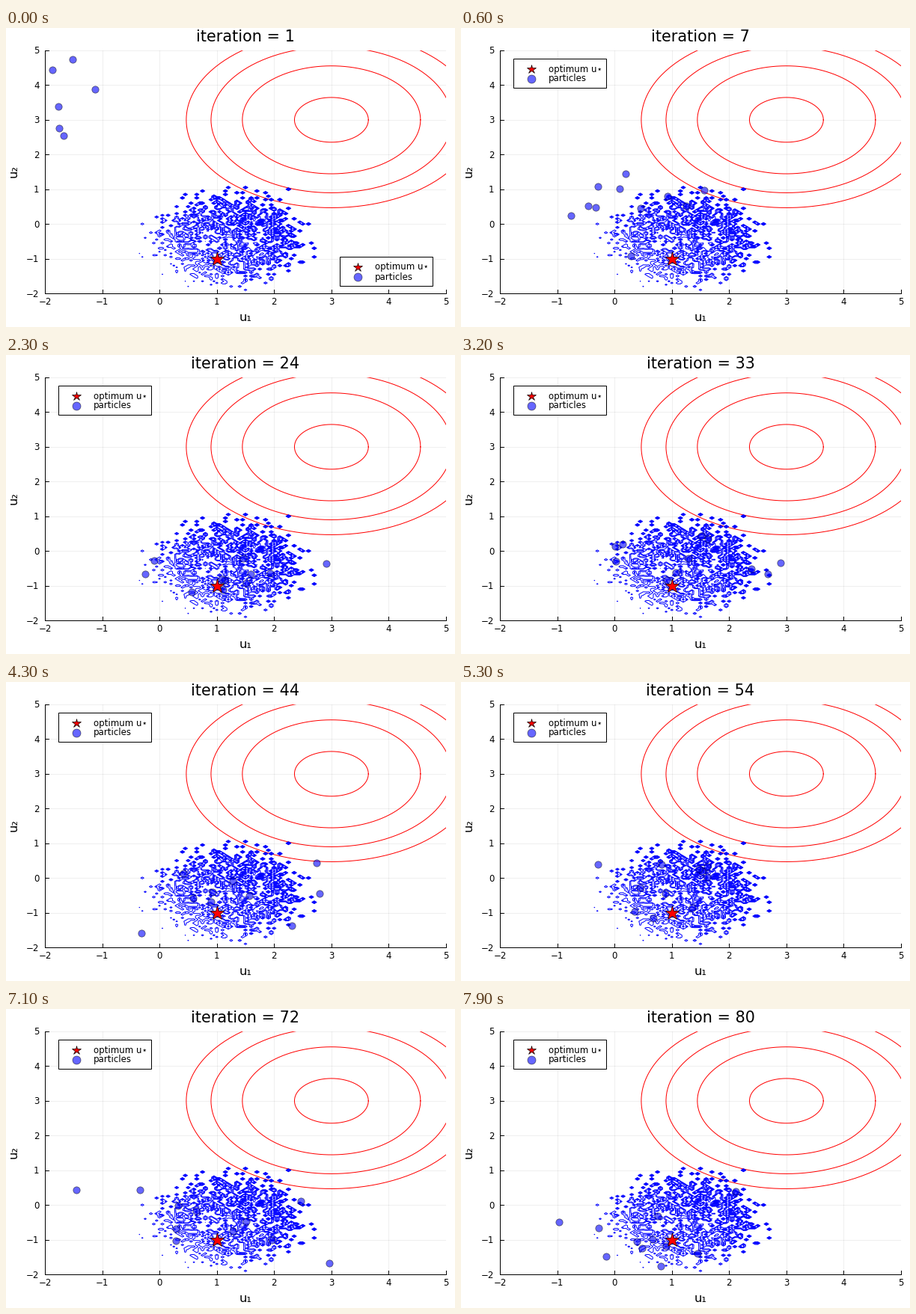
These frames come from a looping animation (600x400 px, 8000 ms). A matplotlib script:

```python
import numpy as np
import matplotlib.pyplot as plt
from matplotlib.animation import FuncAnimation
from matplotlib.patches import Rectangle

W, H, DPI = 600, 400, 100
FRAMES, INTERVAL = 80, 100
PX = 72 / DPI
L, R, T, B = 52, 588, 30, 355
LEGEND_MOVE = 5
FILL, EDGE = (0, 0, 1, 0.6), (0, 0, 0, 0.6)

plt.rcParams["font.family"] = "DejaVu Sans"
rng = np.random.default_rng(7)

fig = plt.figure(figsize=(W / DPI, H / DPI), dpi=DPI, facecolor="white")
ax = fig.add_axes([L / W, 1 - B / H, (R - L) / W, (B - T) / H])
ax.set(xlim=(-2, 5), ylim=(-2, 5))
ax.axis("off")
page = fig.add_axes([0, 0, 1, 1])
page.set(xlim=(0, W), ylim=(H, 0))
page.patch.set_visible(False)
page.axis("off")


def text(x, y, s, size, ha="center", **kw):
    kw.setdefault("va", "baseline")
    return page.text(x, y, s, fontsize=size * PX, ha=ha, **kw)


def stroke(x, y):
    page.plot(x, y, color="black", lw=PX)


def marker(axes, x, y, shape, size, face, edge, z):
    return axes.plot(x, y, shape, ms=size * PX, mfc=face, mec=edge,
                     mew=0.7 * PX, zorder=z)[0]


def draw_frame():
    for v in range(-2, 6):
        ax.axvline(v, color="black", alpha=0.1, lw=0.6 * PX, zorder=0)
        ax.axhline(v, color="black", alpha=0.1, lw=0.6 * PX, zorder=0)
        x = L + (v + 2) * (R - L) / 7
        y = B - (v + 2) * (B - T) / 7
        label = str(v).replace("-", "\u2212")
        stroke([x, x], [B, B - 5])
        stroke([L, L + 5], [y, y])
        text(x, 370, label, 11.8)
        text(44.5, y + 4.5, label, 11.8, "right")
    stroke([L, L, R], [T, B, B])
    text(320, 392, "u\u2081", 16.2)
    text(10.5, 191, "u\u2082", 16.2, va="center", rotation=90)


def draw_goal():
    a = np.linspace(0, 2 * np.pi, 240)
    for k in range(4):
        r = np.sqrt(0.416 + 2 * k)
        ax.plot(3 + r * np.cos(a), 3 + r * np.sin(a), color="red", lw=PX, zorder=1)


def draw_noise():
    """Random spikes on a tilted plane, thinning out with radius."""
    g = np.linspace(-2, 5, 141)
    x, y = np.meshgrid(g, g)
    r = np.hypot(x - 1.22, y + 0.45)
    hit = rng.random(x.shape) < 0.7 * np.exp(-(r / 1.13) ** 4)
    height = (1.79 + 0.8 * x + 0.81 * y) * rng.uniform(0.75, 1.1, x.shape)
    ax.contour(g, g, np.where(hit, height, 0), levels=[0.6, 1.4, 2.2, 3],
               colors="blue", linewidths=PX, zorder=2)


def legend(x, y):
    box = Rectangle((x, y), 124, 39, fc="white", ec="black", lw=PX, zorder=4)
    page.add_patch(box)
    return [box,
            marker(page, x + 24, y + 13.5, "*", 13, "red", "black", 5),
            marker(page, x + 24, y + 26.5, "o", 11, FILL, EDGE, 5),
            text(x + 47, y + 17.5, "optimum u\u22c6", 11.8, "left", zorder=5),
            text(x + 47, y + 30.5, "particles", 11.8, "left", zorder=5)]


def build_paths(hidden=5, memory=0.6, settle=4):
    """Particles fall towards the blob, then wander around it."""
    seen = [(-1.87, 4.44), (-1.52, 4.74), (-1.12, 3.89),
            (-1.77, 3.38), (-1.75, 2.76), (-1.68, 2.54)]
    above = rng.uniform((-2, 5.3), (-1, 6), (hidden, 2))
    start = np.vstack([seen, above])
    home = np.array([1.25, -0.35])
    spread = np.array([0.95, 0.72])
    noise = rng.normal(size=(FRAMES, *start.shape))
    for i in range(1, FRAMES):
        noise[i] = memory * noise[i - 1] + np.sqrt(1 - memory ** 2) * noise[i]
    fade = np.exp(-np.arange(FRAMES) / settle)[:, None, None]
    return home + (start - home) * fade + spread * noise * (1 - fade)


draw_frame()
draw_goal()
draw_noise()
marker(ax, [1], [-1], "*", 19.5, "red", "black", 6)
paths = build_paths()
dots = marker(ax, [], [], "o", 9.3, FILL, EDGE, 3)
title = text(320, 18, "", 20.8)
low_legend = legend(446, 306)
top_legend = legend(70, 41)


def update(i):
    title.set_text(f"iteration = {i + 1}")
    dots.set_data(paths[i, :, 0], paths[i, :, 1])
    for item in low_legend:
        item.set_visible(i < LEGEND_MOVE)
    for item in top_legend:
        item.set_visible(i >= LEGEND_MOVE)
    return [title, dots, *low_legend, *top_legend]


anim = FuncAnimation(fig, update, frames=FRAMES, interval=INTERVAL,
                     repeat=True, repeat_delay=0, blit=False)
plt.show()
```
